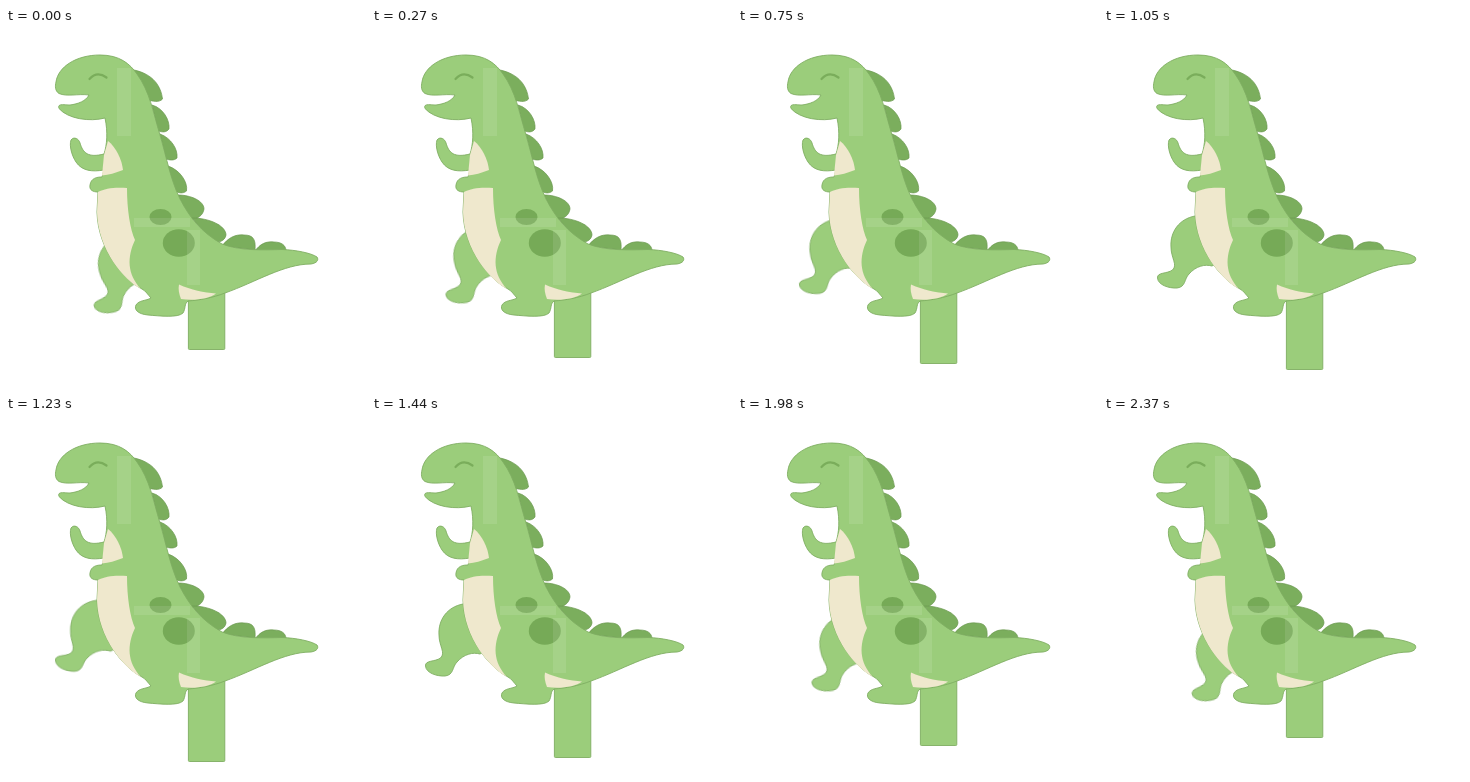
An HTML page that plays this animation: 360x360 px, repeating every 2.43 s.

```html
<!DOCTYPE html>
<html lang="en">
<head>
<meta charset="utf-8">
<title>Paper dinosaur</title>
<style>
  html, body { margin: 0; width: 100%; height: 100%; overflow: hidden; background: #fff; }
  svg { display: block; width: 100vw; height: 100vh; }
  .skin { fill: #9bcd7b; stroke: #7fae62; stroke-width: .9; stroke-linejoin: round; }
  .spikes { fill: #7bae5d; stroke: #6b9850; stroke-width: .7; }
  .cream { fill: #efe8cd; }
  .crease { fill: #fff; opacity: .1; }
  .spot { fill: #76aa57; }
  .smile { fill: none; stroke: #7aad5b; stroke-width: 2.2; stroke-linecap: round; }

  /* Nine held poses of 270 ms each, out and back */
  .leg, .tab { animation: 2430ms step-end infinite; }
  .leg { animation-name: step; transform-origin: 66px 250px; }
  .tab { animation-name: slide; }

  @keyframes step {
    0%, 88.888%, 100% { transform: translate(34.5px, 25.5px) rotate(-14deg); }
    11.111%, 77.777%  { transform: translate(20.5px, 15.5px) rotate(-9deg); }
    22.222%, 66.666%  { transform: translate(8px, 6px) rotate(-5deg); }
    33.333%, 55.555%  { transform: none; }
    44.444%           { transform: translate(-4px, -5px) rotate(3deg); }
  }
  @keyframes slide {
    0%, 88.888%, 100% { transform: none; }
    11.111%, 77.777%  { transform: translateY(8px); }
    22.222%, 66.666%  { transform: translateY(14px); }
    33.333%, 55.555%  { transform: translateY(20px); }
    44.444%           { transform: translateY(24px); }
  }
</style>
</head>
<body>
<svg viewBox="0 0 360 360">
  <rect class="skin tab" x="182.4" y="235" width="36.4" height="86.500" rx="1"/>

  <path class="skin leg" d="M108 186 L91 188 C75 191 66 204 67 219 C67 230 74 237 68.500 242
    C63 246 53 244 53.500 250 C54 257 65 260.500 73 260 C82 259 80 251 85 246
    C92 238 101 236 108 238 L128 226 L126 196Z"/>

  <g class="spikes">
    <path d="M128 42 C147 46 155 58 156.500 71 C153 75 147 73 141 72Z"/>
    <path d="M146 77 C157 80 164 92 163 101 C160 105 156 104 152 103Z"/>
    <path d="M154 106 C165 110 172 121 171 130 C168 133 163 132 160 131Z"/>
    <path d="M162 138 C174 142 182 154 180.500 163 C177 166 172 165 169 163Z"/>
    <path d="M172 167 C185 167 198 173 198 181 C197 188 191 191 184 192Z"/>
    <path d="M186 190 C204 190 220 198 220 207 C219 213 213 215 206 214Z"/>
    <path d="M216 218 C222 210 229 206 238 207 C247 207 250 211 249 222Z"/>
    <path d="M249 223 C254 216 260 213 268 214 C275 214 280 217 280 223Z"/>
  </g>

  <path class="skin" d="M50 54 C52 39 70 27 94 27 C114 27 124 36 131 46 C144 64 147 84 154 107
    C161 131 164 150 174 171 C184 190 195 204 216 216 C234 223 258 222 276 221.500
    C290 222 305 225 311 229 C313 232 311 235 305 236 C278 236 250 254 219 265
    C206 270 194 272 182 273 C178 276 180 280 177 285 C172 290 154 288 142 287
    C131 286 128 281 130 277 C133 272 140 273 145 270 C142 267 140 263 136 261
    C118 252 92 222 91 184 L92 164 C87 164 83 162 84 157 C85 150 91 149 96 149
    L98 142 C86 144 76 143 70 134 C66 128 63 118 65 112 C68 108 73 111 74 115
    C77 125 82 130 98 126 C101 117 102 104 99 90 C84 94 62 91 53 80.500
    C51 75 58 77 64 77 C72 76 80 73 83 67 C72 65.500 61 69 53 65.500 C49 63 49 58 50 54Z"/>

  <g class="cream">
    <path d="M102 113 C110 119 116 132 117 142 C109 145 103 147 96 147.500 L98 127Z"/>
    <path d="M92 164 C99 160 110 159 121 160 C121 181 124 201 129 212
      C121 229 121 246 135 261 C118 252 92 222 91 184Z"/>
    <path d="M173 256.500 C185 262 198 264.500 210 265.500 C203 271 188 273 175 271
      C173 266 172 261 173 256.500Z"/>
  </g>

  <ellipse class="spot" cx="154.500" cy="189" rx="11" ry="8"/>
  <ellipse class="spot" cx="172.800" cy="215" rx="16" ry="13.700"/>
  <path class="smile" d="M83.500 51 Q91 42.500 100.500 49.500"/>

  <g class="crease">
    <rect x="111" y="40" width="14" height="68"/>
    <rect x="128" y="190" width="56" height="9"/>
    <rect x="181" y="202" width="13" height="55"/>
  </g>
</svg>
</body>
</html>
```
